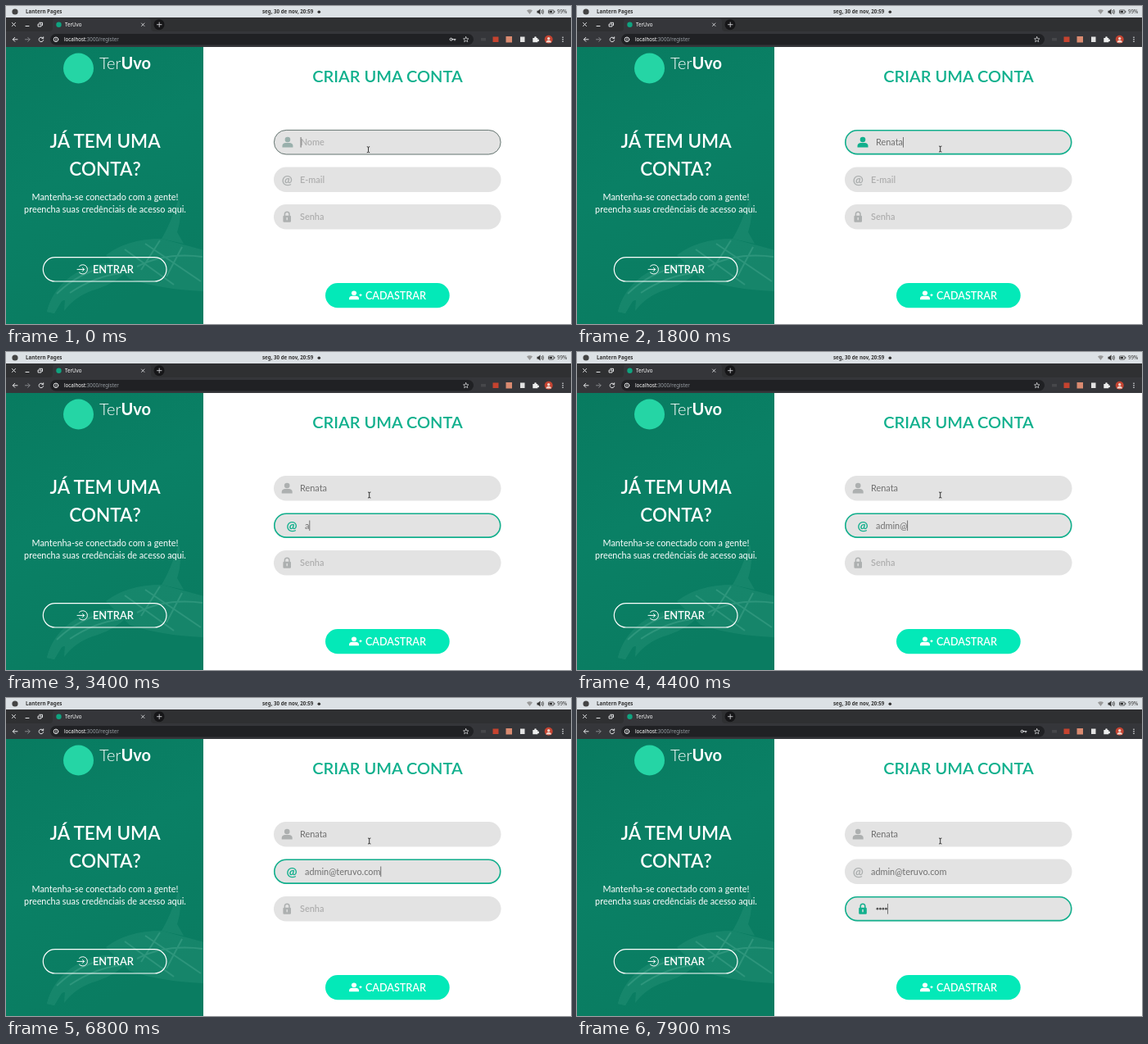
Write an HTML page that moves like this. It is 690x388 px and loops after 8 s.

```html
<!DOCTYPE html>
<html lang="pt-BR">
<head>
<meta charset="utf-8">
<title>Criar uma conta</title>
<style>
html, body { margin: 0; width: 100%; height: 100%; overflow: hidden; background: #fff; }
svg { display: block; width: 690px; height: 388px; font-family: Lato, "Open Sans", sans-serif; }
.bar { font: 6.2px "Noto Sans", sans-serif; }
.bar .b { font-weight: 700; }
.b { font-weight: 600; }
.mid { text-anchor: middle; }
.hint { font-weight: 600; fill: #aeaeae; }
.value { fill: #707070; }
.line { fill: none; stroke: #e4e5e7; stroke-width: 1; stroke-linecap: round; stroke-linejoin: round; }
</style>
</head>
<body>
<svg viewBox="0 0 690 388">
  <defs>
    <linearGradient id="sea" x1="0" y1="0" x2=".4" y2="1">
      <stop offset="0" stop-color="#087b60"/>
      <stop offset=".5" stop-color="#0a8065"/>
      <stop offset="1" stop-color="#0a7c61"/>
    </linearGradient>
    <clipPath id="page"><path d="M0 50H241V388H0z"/></clipPath>
    <g id="user"><circle cy="-3.200" r="3.300"/><path d="M-6.500 6.300V4.500C-6.500 2 -4.500 .8 -2.500 .8H2.500C4.500 .8 6.500 2 6.500 4.500V6.300z"/></g>
    <g id="lock">
      <path d="M-2.800 -1V-3.200A2.800 2.800 0 0 1 2.800 -3.200V-1" fill="none" stroke="currentColor" stroke-width="1.500"/>
      <rect x="-4.800" y="-1.500" width="9.600" height="8" rx="1.200"/>
      <path d="M0 1.300V3.500" stroke="#e2e2e2" stroke-width="1.400" stroke-linecap="round"/>
    </g>
    <text id="at" class="mid" y="5" font-size="15.500" font-weight="700">@</text>
  </defs>

  <!-- system bar -->
  <path d="M0 0H690V14H0z" fill="#dce1e5"/>
  <g class="bar" fill="#333">
    <circle cx="11" cy="7" r="3.600" fill="#444"/>
    <text class="b" x="24" y="9.300">Lantern Pages</text>
    <text class="b" x="313" y="9.300">seg, 30 de nov, 20:59</text>
    <circle cx="382.300" cy="7.200" r="1.800"/>
    <path d="M636 5.500Q639.500 2.800 643 5.500L639.500 10z" fill="#999"/>
    <path d="M648.500 5.700H650L652.500 3.500V10.500L650 8.400H648.500z"/>
    <path d="M654 5Q655.500 7 654 9M655.500 4Q657.500 7 655.500 10" fill="none" stroke="#333" stroke-width=".8"/>
    <rect x="662.500" y="5" width="6.500" height="4" rx=".8" fill="none" stroke="#333" stroke-width=".8"/>
    <path d="M663.500 6H667V8H663.500zM669.500 6H670.300V8H669.500z"/>
    <text x="673" y="9.200">99%</text>
  </g>

  <!-- browser -->
  <path d="M0 14H690V31H0z" fill="#2f3032"/>
  <path d="M0 31H690V50H0z" fill="#35363a"/>
  <path d="M53 31Q57 31 57 27V19Q57 15 61 15H173Q177 15 177 19V27Q177 31 181 31z" fill="#35363a"/>
  <circle cx="187" cy="22.700" r="6.500" fill="#161618"/>
  <rect x="54" y="34" width="517" height="13.500" rx="6.750" fill="#202124"/>
  <g class="line">
    <path d="M7.500 20.500L11.500 24.500M11.500 20.500L7.500 24.500M24 24.500H28M39.500 22H43V25H39.500zM40.800 20.300H44.500V23.500"/>
    <path d="M165.500 21L169 24.500M169 21L165.500 24.500M184.500 22.700H190M187.200 20V25.500" stroke-width=".8"/>
    <path d="M14 40.800H8.500M10.800 38.300L8.300 40.800L10.800 43.300"/>
    <path d="M23.500 40.800H29M26.700 38.300L29.200 40.800L26.700 43.300" stroke="#85878a"/>
    <path d="M45.200 39.200A2.800 2.800 0 1 0 45.700 41.600M45.700 37.800V39.600H43.900"/>
    <circle cx="61" cy="40.800" r="2.800"/>
    <path d="M61 40.600V42.200M61 39.300V39.400"/>
    <path d="M561.700 37.600L562.600 39.700L564.900 39.900L563.200 41.400L563.700 43.700L561.700 42.500L559.700 43.700L560.200 41.400L558.500 39.900L560.800 39.700z" stroke-width=".7"/>
  </g>
  <g id="key"><circle class="line" cx="543.600" cy="40.700" r="1.500"/><path class="line" d="M545.500 40.700H549M548 41V42"/></g>
  <circle cx="64.500" cy="22.700" r="3.200" fill="#0fa480"/>
  <g class="bar" fill="#fff">
    <text x="72" y="25">TerUvo</text>
    <text x="71" y="43">localhost<tspan fill="#9aa0a6">:3000/register</tspan></text>
  </g>
  <path d="M580 39H586V42.500H580z" fill="#46474a"/>
  <rect x="594.500" y="37.500" width="7" height="6.500" fill="#c5432f"/>
  <rect x="610.500" y="37" width="7.500" height="7.500" fill="#d98a70"/>
  <rect x="628" y="37.500" width="5.500" height="6.500" fill="#e2e2e2"/>
  <path d="M643.300 39H645.300A1.300 1.300 0 1 1 647.700 39H649.300V40.800A1.200 1.200 0 1 1 649.300 43V44.300H643.300z" fill="#eceded"/>
  <circle cx="662.700" cy="40.700" r="5" fill="#c44432"/>
  <path d="M659.500 44.500Q659.700 41.700 662.700 41.700T665.900 44.500z" fill="#efd8cf"/><circle cx="662.700" cy="39.700" r="1.700" fill="#efd8cf"/>
  <g fill="#e8eaed"><circle cx="680" cy="38.300" r=".8"/><circle cx="680" cy="40.800" r=".8"/><circle cx="680" cy="43.300" r=".8"/></g>

  <!-- side panel -->
  <g clip-path="url(#page)">
    <path d="M0 50H242V388H0z" fill="url(#sea)"/>
    <g fill="#b9ffe5" opacity=".07">
      <path d="M122 304Q148 284 190 284L242 298V348Q190 346 151 333z"/>
      <path d="M131 314Q105 312 79 330Q56 347 50 373L59 375Q64 359 72 359L71 372Q86 352 112 345Q135 337 147 324z"/>
      <path d="M190 284Q201 266 211 234Q216 254 209 276L217 290z"/>
      <path d="M50 373Q56 349 75 340L73 352L59 375z"/>
    </g>
    <g fill="none" stroke="#c8ffea" stroke-width="2" opacity=".13">
      <path d="M62 351Q90 324 128 317M78 350Q108 330 140 326M145 297L205 340M170 290L238 336M160 318Q195 300 240 306M188 286L165 322M215 294L196 330"/>
    </g>
    <circle cx="88.500" cy="76" r="18.500" fill="#25d5a5"/>
  </g>
  <g fill="#fff">
    <text x="114" y="76.500" font-size="20" font-weight="300">Ter<tspan font-weight="700">Uvo</tspan></text>
    <g class="mid">
      <g class="b" font-size="22.500"><text x="121" y="172.800">JÁ TEM UMA</text><text x="121" y="206.500">CONTA?</text></g>
      <g font-size="10.850"><text x="121" y="236.500">Mantenha-se conectado com a gente!</text><text x="121" y="251.500">preencha suas credênciais de acesso aqui.</text></g>
    </g>
    <rect x="45.300" y="306.700" width="150.700" height="29.300" rx="14.650" fill="none" stroke="#fff" stroke-width="1.200"/>
    <path class="line" d="M89.500 317.500A5.700 5.700 0 1 1 89.500 325.200M87 321.400H95.500M93.500 319.400L95.500 321.400L93.500 323.400" style="stroke:#fff"/>
    <text class="b" x="106" y="326" font-size="12.800">ENTRAR</text>
  </g>

  <!-- form -->
  <text class="b mid" x="466" y="93" font-size="20" fill="#10b08d">CRIAR UMA CONTA</text>
  <g id="form" font-size="10.900"></g>
  <rect x="390" y="338" width="151.700" height="30.200" rx="15.100" fill="#03e9b8"/>
  <g fill="#fff">
    <use href="#user" transform="translate(425 353) scale(.92 .85)"/>
    <path d="M431.500 352.700H434.500M433 351.200V354.200" stroke="#fff" stroke-width="1.200"/>
    <text class="b" x="439" y="357.800" font-size="12.600">CADASTRAR</text>
  </g>
  <path id="mouse" d="M-1.700 -3.500Q0 -3.500 0 -2.500Q0 -3.500 1.700 -3.500M0 -2.500V2.500M-1.700 3.500Q0 3.500 0 2.500Q0 3.500 1.700 3.500" fill="none" stroke="#222" stroke-width=".9"/>
</svg>
<script>
const LOOP = 8000, GREEN = '#12b08d';
const $ = id => document.getElementById(id);

// keys: the time at which each character appears
const fields = [
  { y: 166.200, icon: 'user', hint: 'Nome', text: 'Renata', from: -70, to: 1900,
    keys: [1000, 1150, 1300, 1450, 1600, 1750] },
  { y: 211.700, icon: 'at', hint: 'E-mail', text: 'admin@teruvo.com', from: 1900, to: 6900,
    keys: [3400, 3500, 3600, 3700, 3800, 4400, 5100, 5300, 5500,
           6000, 6100, 6200, 6300, 6400, 6500, 6700] },
  { y: 257.200, icon: 'lock', hint: 'Senha', text: '••••', from: 6900, to: LOOP, secret: true,
    keys: [7300, 7500, 7700, 7900] }
];
const caretOff = [[500, 1000], [2400, 2900], [4000, 4400], [4900, 5100]];

const clamp = v => Math.max(0, Math.min(1, v));
const ease = v => { v = clamp(v); return v * v * (3 - 2 * v); };
const mix = (a, b, p) => `color-mix(in srgb, ${b} ${p * 100}%, ${a})`;
const show = (el, on) => el.style.display = on ? '' : 'none';

function add(parent, tag, attrs) {
  const el = document.createElementNS('http://www.w3.org/2000/svg', tag);
  for (const k in attrs) el.setAttribute(k, attrs[k]);
  return parent.appendChild(el);
}

for (const f of fields) {
  const { y } = f, form = $('form');
  f.box = add(form, 'rect', { x: 327, y: y - 15.200, width: 277.500, height: 30.400, rx: 15.200, fill: '#e3e3e3' });
  f.ring = add(form, 'rect', { fill: 'none' });
  f.mark = add(form, 'use', { href: '#' + f.icon });
  f.label = add(form, 'text', { y: y + 4 });
  f.dots = f.secret ? f.keys.map(() => add(form, 'circle', { cy: y, r: 1.400, fill: '#555' })) : [];
  f.caret = add(form, 'rect', { y: y - 6.200, width: .8, height: 12.600, fill: '#555' });
}

function drawField(f, t) {
  const focused = t >= f.from && t < f.to;
  const p = ease((t - f.from) / 320) * (1 - ease((t - f.to) / 320));
  const typed = f.keys.filter(k => k <= t).length;
  const x = 359 + (typed ? 6 : 5.300) * p;
  const w = .7 + .9 * p;

  show(f.ring, focused);
  const ring = { x: 327 + w / 2, y: f.y - 15.200 + w / 2, width: 277.500 - w, height: 30.400 - w,
    rx: 15.200 - w / 2, stroke: mix('#555', GREEN, p), 'stroke-width': w };
  for (const k in ring) f.ring.setAttribute(k, ring[k]);

  f.mark.setAttribute('transform', `translate(${343.200 + 5.800 * p} ${f.y})`);
  f.mark.style.fill = f.mark.style.color = mix('#adb0b0', GREEN, p);

  f.label.textContent = !typed ? f.hint : f.secret ? '' : f.text.slice(0, typed);
  f.label.setAttribute('class', typed ? 'value' : 'hint');
  f.label.setAttribute('x', x);
  f.dots.forEach((d, i) => {
    show(d, i < typed);
    d.setAttribute('cx', x + 1.900 + 3.500 * i);
  });

  const width = !typed ? 0 : f.secret ? 3.500 * typed : f.label.getComputedTextLength();
  f.caret.setAttribute('x', x + width);
  show(f.caret, focused && !caretOff.some(([a, b]) => t >= a && t < b));
}

function draw(now) {
  const t = now % LOOP, m = ease(t / 300);
  for (const f of fields) drawField(f, t);
  show($('key'), t < 1000 || t >= 7300);
  $('mouse').setAttribute('transform', `translate(${442.500 + 1.200 * m} ${175.200 - .7 * m})`);
  requestAnimationFrame(draw);
}
requestAnimationFrame(draw);
</script>
</body>
</html>
```
